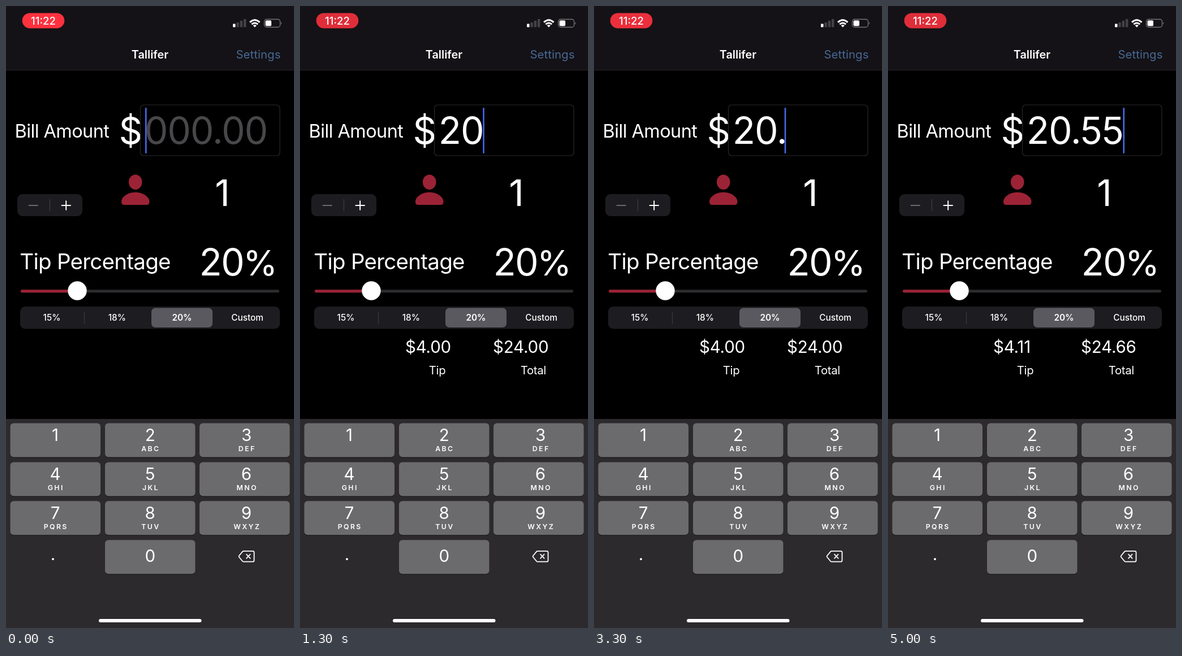
Animation, 509 px wide and 1101 px high, one loop 5100 ms. Source, as an HTML page:

```html
<!DOCTYPE html>
<html lang="en">
<head>
<meta charset="utf-8">
<title>Tip calculator</title>
<style>
  html, body { margin: 0; width: 100%; height: 100%; overflow: hidden; background: #000; }
  svg { display: block; width: 509px; height: 1101px; }
  text { font-family: Inter, Roboto, sans-serif; font-optical-sizing: none; fill: #fff; white-space: pre; }
  .mid { text-anchor: middle; }
  .big { font-size: 66px; letter-spacing: -1.7px; }
  .sum { font-size: 29.5px; letter-spacing: -.2px; }
  .seg { font-size: 15.3px; font-weight: 500; text-anchor: middle; }
  .digit { font-size: 29.5px; text-anchor: middle; }
  .letters { font-size: 12.3px; font-weight: 600; letter-spacing: 2.4px; text-anchor: middle; }
  .line { fill: none; stroke: #fff; stroke-width: 2; stroke-linecap: round; stroke-linejoin: round; }
</style>
</head>
<body>
<svg viewBox="0 0 509 1101">
  <rect width="509" height="1101"/>

  <!-- status bar and header -->
  <rect width="509" height="113" fill="#141216"/>
  <rect y="113" width="509" height="1" fill="#242327"/>
  <rect id="pill" x="28.7" y="12.4" width="74.6" height="27" rx="13.5"/>
  <text class="mid" x="66" y="32.5" font-size="18.5" font-weight="500">11:22</text>
  <rect x="401" y="31.5" width="4.5" height="6" rx="1" fill="#fff"/>
  <g fill="#434145">
    <rect x="407.3" y="29" width="4.5" height="8.5" rx="1"/>
    <rect x="413.6" y="26" width="4.5" height="11.5" rx="1"/>
    <rect x="419.9" y="23" width="4.5" height="14.5" rx="1"/>
  </g>
  <g fill="none" stroke="#fff" stroke-width="3">
    <path d="M431 28.8Q439.7 20.7 448.4 28.8"/>
    <path d="M434.3 32.4Q439.7 27.6 445.1 32.4"/>
  </g>
  <path d="M436.6 34.5Q439.7 32 442.8 34.5L439.7 37.8Z" fill="#fff"/>
  <rect x="456.5" y="23.5" width="28" height="14" rx="4" fill="none" stroke="#77757a" stroke-width="1.3"/>
  <rect x="458.5" y="25.5" width="10.5" height="10" rx="2" fill="#fff"/>
  <path d="M486 28q2.4 2.5 0 5z" fill="#77757a"/>
  <text class="mid" x="254.5" y="93" font-size="19.8" font-weight="600">Tallifer</text>
  <text x="406.5" y="93" font-size="20.3" letter-spacing=".1" style="fill:#486995">Settings</text>

  <!-- bill -->
  <text x="15.5" y="232.5" font-size="32.5" letter-spacing="-.6">Bill Amount</text>
  <text class="mid" x="220.3" y="244" font-size="65">$</text>
  <rect x="237.5" y="175" width="246.5" height="90" rx="6" fill="none" stroke="#29282b" stroke-width="1.2"/>
  <text id="bill" class="big" x="244.8" y="244" style="letter-spacing:-1.1px"></text>
  <rect id="caret" y="180" width="2.6" height="81" rx="1.2" fill="#4868ea"/>

  <!-- people -->
  <g fill="#9b2335">
    <ellipse cx="228.7" cy="311.7" rx="11.8" ry="13.3"/>
    <path d="M204 346.5C204 338.5 214 329.7 228.7 329.7S253.5 338.5 253.5 346.5Q253.5 352 248.5 352H209Q204 352 204 346.5Z"/>
  </g>
  <text class="mid" x="382.5" y="354" font-size="65">1</text>
  <rect x="20" y="333" width="115" height="39" rx="9" fill="#1d1c20"/>
  <path class="line" d="M40.5 353H56" style="stroke:#6a696d"/>
  <path d="M77.5 342V363" stroke="#3d3c40" stroke-width="1.3"/>
  <path class="line" d="M98.5 353H114M106.2 345.3V360.7"/>

  <!-- tip -->
  <text x="24.3" y="466" font-size="38.5" letter-spacing="-.75">Tip Percentage</text>
  <text class="big" x="341.5" y="476.5">20<tspan dx="-1" font-size="62">%</tspan></text>
  <rect x="26" y="502.3" width="457" height="5" rx="2.5" fill="#2c2b2e"/>
  <rect x="26" y="502.3" width="100" height="5" rx="2.5" fill="#9b2335"/>
  <circle cx="126" cy="504" r="16.7" fill="#fff"/>
  <rect x="25" y="532" width="459" height="39.5" rx="9" fill="#1d1c20"/>
  <rect x="257" y="534.5" width="108" height="34.5" rx="7" fill="#5b5960"/>
  <path d="M138.5 541V563" stroke="#39383c" stroke-width="1.3"/>
  <text class="seg" x="81" y="557">15%</text>
  <text class="seg" x="196.3" y="557">18%</text>
  <text class="seg" x="311" y="557" style="font-weight:600">20%</text>
  <text class="seg" x="426.5" y="557">Custom</text>
  <g id="sums">
    <text id="tip" class="sum" x="186" y="613.5"></text>
    <text id="total" class="sum" x="341" y="613.5"></text>
    <text x="227.7" y="652" font-size="20.3" letter-spacing="-.2">Tip</text>
    <text x="389.8" y="652" font-size="20.3" letter-spacing="-.35">Total</text>
  </g>

  <!-- keyboard -->
  <rect y="731" width="509" height="370" fill="#2c2a2d"/>
  <g id="keys"></g>
  <text class="digit" x="83" y="981">.</text>
  <path class="line" d="M420 964.8H436Q438.5 964.8 438.5 967.3V981.2Q438.5 983.7 436 983.7H420Q418.8 983.7 418 982.7L412 975.5Q411 974.2 412 973L418 965.8Q418.8 964.8 420 964.8ZM425 970.7L431.6 977.7M431.6 970.7L425 977.7" style="stroke-width:1.8"/>
  <rect x="164" y="1085" width="181.5" height="6" rx="3" fill="#fff"/>
</svg>
<script>
const LOOP = 5100, STEP = 100, PULSE = 1850;
const KEY = '#6b6a6d', KEY_DOWN = '#464449';
const $ = id => document.getElementById(id);

// When the field changes: time, content, caret position
const typed = [
  [-900, '', 247.3],
  [1000, '2', 286],
  [1200, '20', 324.5],
  [2400, '20.', 338],
  [3700, '20.5', 377.5],
  [4000, '20.55', 416.7]
];
// Key, down, up
const presses = [['2', 900, 1100], ['0', 1100, 1300], ['5', 3600, 3800], ['5', 3900, 4100]];
// Caret opacity for each tenth of a second
const blink = [1, 1, 1, 1, 1, .5, 0, 0, .45, 1];

const letters = ['', 'ABC', 'DEF', 'GHI', 'JKL', 'MNO', 'PQRS', 'TUV', 'WXYZ'];
const lefts = [7.5, 175, 342], centres = [87, 254.7, 425];

function keyMarkup(digit, col, row, label) {
  const x = lefts[col], y = 738.5 + row * 68.9, cx = centres[col];
  return `<rect x="${x}" y="${y + 1.3}" width="159.5" height="60" rx="6" fill="#19181a"/>
    <rect id="key${digit}" x="${x}" y="${y}" width="159.5" height="60" rx="6" fill="${KEY}"/>
    <text class="digit" x="${cx}" y="${y + (digit ? 31.8 : 39)}">${digit}</text>
    <text class="letters" x="${cx + 1.2}" y="${y + 49.8}">${label}</text>`;
}
$('keys').innerHTML = letters
  .map((label, i) => keyMarkup(i + 1, i % 3, Math.floor(i / 3), label))
  .join('') + keyMarkup(0, 1, 3, '');

const money = v => '$' + v.toFixed(2);

function draw(t) {
  const glow = Math.cos(2 * Math.PI * t / PULSE);
  $('pill').setAttribute('fill', `rgb(${230 + 24 * glow},${47 + 2 * glow},${59 + 4 * glow})`);

  const [since, bill, caretX] = typed.filter(e => e[0] <= t).pop();
  const age = t - since;
  $('bill').textContent = bill || '000.00';
  $('bill').style.fill = bill ? '#fff' : '#48474a';
  $('caret').setAttribute('x', caretX - 1.3);
  $('caret').setAttribute('opacity', age ? blink[age / STEP % blink.length] : .8);

  $('sums').setAttribute('visibility', bill ? 'visible' : 'hidden');
  $('tip').textContent = money(bill * .2);
  $('total').textContent = money(bill * 1.2);

  for (const digit of ['2', '0', '5']) {
    const down = presses.some(([k, from, to]) => k === digit && t >= from && t < to);
    $('key' + digit).setAttribute('fill', down ? KEY_DOWN : KEY);
  }
}

const start = performance.now();
function tick() {
  const t = (performance.now() - start) % LOOP;
  draw(Math.floor(t / STEP) * STEP);
  requestAnimationFrame(tick);
}
tick();
</script>
</body>
</html>
```
